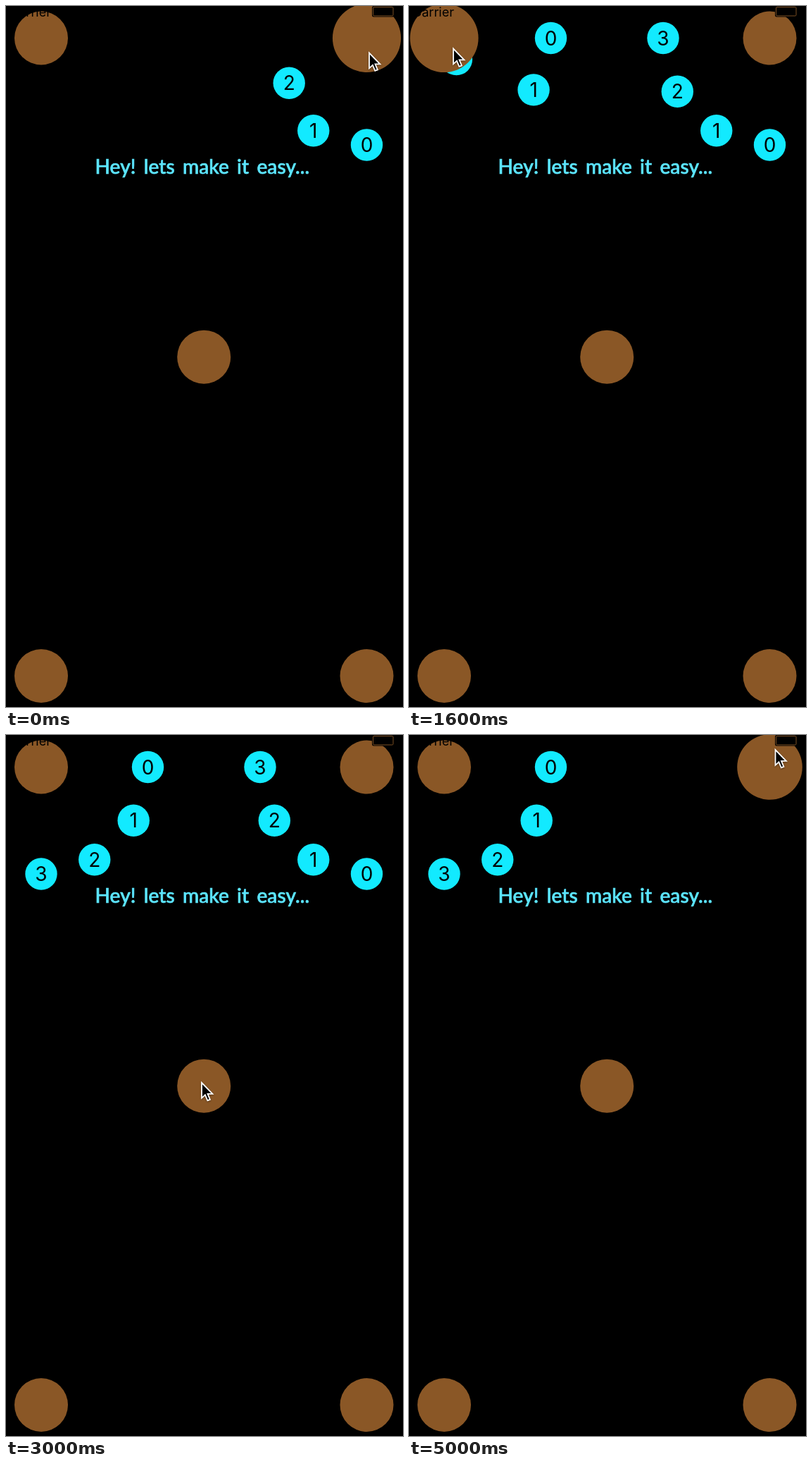
Recreate the animation shown at these times as an HTML page. Size 564 by 994 pixels, loop 5100 ms.

```html
<!DOCTYPE html>
<html lang="en">
<head>
<meta charset="utf-8">
<title>Radial menus</title>
<style>
  html, body { margin: 0; width: 100%; height: 100%; overflow: hidden; background: #000; }
  svg { display: block; width: 564px; height: 994px; }
  .button { fill: #8a5726; }
  .item circle { fill: #12eaff; }
  .item text { font: 28px Inter, "Liberation Sans", sans-serif; text-anchor: middle; }
  .hint {
    font: 500 28px Lato, "Open Sans", sans-serif;
    letter-spacing: .1px; word-spacing: 4px;
    fill: #5ce6ff; stroke: #5ce6ff; stroke-width: .7;
  }
  .carrier { font: 18px Inter, "Liberation Sans", sans-serif; text-anchor: end; }
  #cursor { stroke: #fff; stroke-width: 1.8; filter: drop-shadow(0 1px 1px rgba(0, 0, 0, .4)); }
</style>
</head>
<body>
<svg viewBox="0 0 564 994">
  <text class="hint" x="126.5" y="238">Hey! lets make it easy...</text>
  <g id="items"></g>
  <g id="buttons"></g>
  <text class="carrier" x="64" y="14.5">Carrier</text>
  <rect x="520" y="0" width="31.5" height="15.5" rx="2.5"/>
  <rect x="521.5" y="1.5" width="28.5" height="12.5" rx="1.5" fill="none" stroke="#8a5726" stroke-width=".9"/>
  <path id="cursor" d="M0 0V21.8L4.9 17.3L8.3 25.4L11.9 23.9L8.5 15.9H15.4Z"/>
</svg>
<script>
const LOOP = 5100, STEP = 100;
const RADIUS = 38, REACH = 151.5, STAGGER = 100, OPEN = 176, CLOSE = 300;
const RISE = 300, FALL = 200, SWELL = 0.294;

const clamp = u => Math.min(1, Math.max(0, u));
const ease = u => (1 - Math.cos(Math.PI * clamp(u))) / 2;

function add(parent, tag, attrs, text = "") {
  const el = document.createElementNS("http://www.w3.org/2000/svg", tag);
  for (const key in attrs) el.setAttribute(key, attrs[key]);
  el.textContent = text;
  return parent.appendChild(el);
}

const itemLayer = document.getElementById("items");
const buttonLayer = document.getElementById("buttons");
const cursor = document.getElementById("cursor");

const addButton = (x, y) => add(buttonLayer, "circle", { class: "button", cx: x, cy: y, r: RADIUS });

function addMenu(x, y, firstAngle, opens, closes) {
  const items = [0, 1, 2, 3].map(i => {
    const el = add(itemLayer, "g", { class: "item" });
    add(el, "circle", { r: 22.7 });
    add(el, "text", { y: 10.2 }, i);
    const angle = (firstAngle + 30 * i) * Math.PI / 180;
    return { el, dx: REACH * Math.cos(angle), dy: REACH * Math.sin(angle) };
  });
  return { x, y, opens, closes, items, button: addButton(x, y) };
}

const menus = [
  addMenu(512.5, 45.5, 90, -330, 4632),
  addMenu(50, 45.5, 0, 1344, Infinity)
];
addButton(281.2, 497.7);
addButton(50, 950);
addButton(512.5, 950);

// start, end, x, y, upward bend
const moves = [
  [600, 1200, 63, 60.5, 43],
  [1900, 2400, 278, 489, 0],
  [2900, 3000, 278, 493, 0],
  [3500, 3600, 334, 256, 0],
  [4050, 4500, 520.5, 21, 0]
];

const pulse = age => age < 0 ? 0 : ease(age / RISE) * (1 - ease((age - RISE) / FALL));

function drawMenu(menu, t) {
  const { x, y, opens, closes } = menu;
  const swell = pulse(t - opens) + pulse(t - closes);
  menu.button.setAttribute("r", RADIUS * (1 + SWELL * swell));
  const kept = 1 - ease((t - closes) / CLOSE);
  menu.items.forEach(({ el, dx, dy }, i) => {
    const spread = ease((t - opens - i * STAGGER) / OPEN) * kept;
    el.setAttribute("transform", `translate(${x + dx * spread} ${y + dy * spread})`);
    el.style.display = spread > 0 ? "" : "none";
  });
}

function drawCursor(t) {
  let x = 516, y = 66.5;
  for (const [start, end, toX, toY, bend] of moves) {
    const u = ease((t - start) / (end - start));
    x += (toX - x) * u;
    y += (toY - y) * u - bend * 4 * u * (1 - u);
  }
  cursor.setAttribute("transform", `translate(${x} ${y})`);
  cursor.style.display = t >= 3700 && t < 4200 ? "none" : "";
}

const began = performance.now();

function draw() {
  const elapsed = (performance.now() - began) % LOOP;
  const t = Math.floor(elapsed / STEP) * STEP;
  menus.forEach(menu => drawMenu(menu, t));
  drawCursor(t);
  requestAnimationFrame(draw);
}
draw();
</script>
</body>
</html>
```
